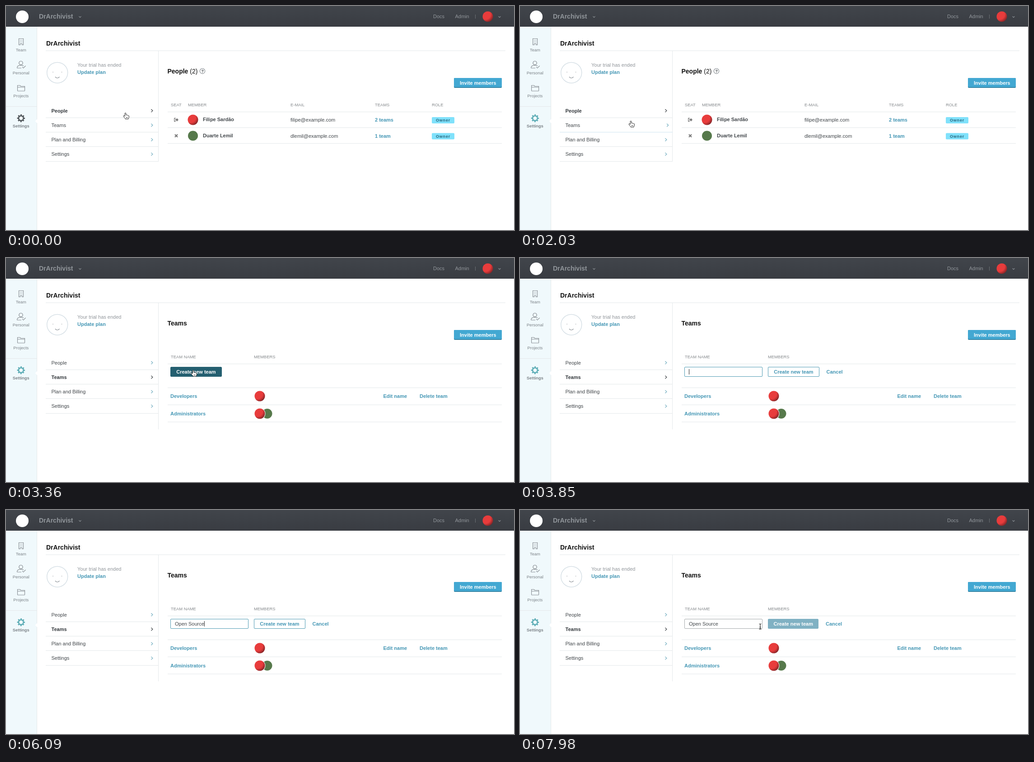
Recreate the animation shown at these times as an HTML page. Size 1125 by 498 pixels, loop 8 s.

```html
<!DOCTYPE html>
<html lang="en">
<head>
<meta charset="utf-8">
<title>Team settings</title>
<style>
html, body { margin: 0; width: 100%; height: 100%; overflow: hidden; background: #fff; }
svg { display: block; width: 100vw; height: 100vh; font: 11px "Liberation Sans", Arial, sans-serif; }
text { fill: #42474b; white-space: pre; }
.bold { font-weight: bold; }
.title { font-size: 14px; font-weight: bold; fill: #111; }
.link { font-weight: bold; fill: #4597b5; }
.head { font-size: 9.4px; fill: #85898c; }
.side { font-size: 9.4px; fill: #7c8388; text-anchor: middle; }
.nav { fill: #91969b; }
.badge { font-size: 9px; font-weight: bold; letter-spacing: .8px; fill: #28687e; }
.icon { fill: none; stroke: #8c9297; stroke-width: 1.2; }
.line { stroke: #e4e8ea; }
.chev { fill: none; stroke: #6ba9bd; stroke-width: 1.2; }
.on text { font-weight: bold; fill: #33383c; }
.on .chev { stroke: #33383c; }
.hand { fill: #fff; stroke: #222; stroke-width: 1; stroke-linejoin: round; }
</style>
</head>
<body>
<svg id="stage" viewBox="0 0 1125 498">
  <defs>
    <radialGradient id="photo" cx=".3" cy=".3" r=".85">
      <stop offset=".55" stop-color="#e83c3c"/><stop offset="1" stop-color="#6b1f22"/>
    </radialGradient>
    <linearGradient id="bar" x2="0" y2="1">
      <stop stop-color="#41454b"/><stop offset="1" stop-color="#393c42"/>
    </linearGradient>
    <circle id="red" r="11.5" fill="url(#photo)"/>
    <circle id="green" r="11" fill="#56794b"/>
  </defs>
  <g id="frame"></g>
  <g id="menu"></g>
  <g id="people"></g>
  <g id="teams">
    <g id="list"></g>
    <g id="form">
      <rect id="field" x="364.5" y="242.5" width="172" height="21" rx="1.5" fill="#fff"/>
      <text id="typed" x="374" y="257"></text>
      <path id="caret" d="M0 247v12" stroke="#222"/>
      <text id="cancel" class="link" y="257">Cancel</text>
    </g>
    <g id="create">
      <rect y="242.5" height="21" rx="1.5"/>
      <text class="bold" y="257">Create new team</text>
    </g>
  </g>
  <g id="ring" fill="none">
    <circle r="24" stroke="#fff" stroke-width="4"/><circle r="24" stroke="#1b1b1b" stroke-width="1.5"/>
  </g>
  <g id="cursor">
    <path class="hand" d="M-1.3 1Q-1.3-.4 0-.4T1.3 1V4.2Q2.9 3.6 3.6 4.8Q5 4.2 5.9 5.4Q7.7 5 7.8 6.8V9Q7.8 10.8 6.6 12.2V13.2H-.4V12.2Q-2.3 10.5-4.2 7.6Q-5 6-3.6 5.7Q-2.4 5.6-1.3 7.2ZM2 9v2.2M4.2 9v2.2" />
    <path class="hand" d="M0 0V13L3 10.2 5 14.6 7 13.7 5.1 9.5H9.2Z"/>
    <path d="M-2.5-6Q0-6 0-4.4Q0-6 2.5-6M0-4.4V4.6M-2.5 6Q0 6 0 4.6Q0 6 2.5 6M-1.5 1.5h3" fill="none" stroke="#222" stroke-width="1.2"/>
  </g>
</svg>
<script>
const LOOP = 8000, STEP = 70;
const PAGE_SWITCH = 2380, FORM_OPEN = 3500, SUBMIT = 6930;
const $ = id => document.getElementById(id);
const show = (el, visible) => el.setAttribute('visibility', visible ? 'inherit' : 'hidden');
const set = (el, attrs) => Object.entries(attrs).forEach(([k, v]) => el.setAttribute(k, v));

const text = (x, y, s, cls = '') => `<text x="${x}" y="${y}" class="${cls}">${s}</text>`;
const line = (x1, y1, x2, y2) => `<path class="line" d="M${x1} ${y1}L${x2} ${y2}"/>`;
const rect = (x, y, w, h, fill, rx = 0) =>
  `<rect x="${x}" y="${y}" width="${w}" height="${h}" fill="${fill}" rx="${rx}"/>`;
const icon = d => `<path class="icon" d="${d}"/>`;
const photo = (id, x, y) => `<use href="#${id}" x="${x}" y="${y}"/>`;

const ORG = 'DrArchivist';
$('frame').innerHTML =
  rect(0, 0, 1125, 46, 'url(#bar)') + rect(0, 46, 69, 452, '#f0f9fc') +
  '<circle cx="36" cy="24" r="14" fill="#fff"/>' +
  text(73, 27.5, ORG, 'title nav') + icon('M161.5 22.8l2.5 2.5 2.5-2.5M1090.5 22.8l2.5 2.5 2.5-2.5') +
  text(946, 27, 'Docs', 'nav') + text(994.5, 27, 'Admin', 'nav') +
  '<path d="M1039.5 19v9" stroke="#6b7075"/>' + photo('red', 1067, 23.5) +
  line(68.5, 46, 68.5, 498) + line(0, 223.5, 69, 223.5) +
  '<path d="M69.5 251L64.5 256L69.5 261Z" fill="#fff"/>' +
  icon('M28.5 72.5h10v14h-3v-3h-4v3h-3zM31 75.5h1.5M34.5 75.5h1.5M31 78h1.5M34.5 78h1.5M31 80.5h1.5M34.5 80.5h1.5') +
  icon('M33 122.5a4.2 4.2 0 1 1-.1 0zM24.5 138q0-5.5 6-6.2h5q2 .3 3.5 1.6M24.5 138h9.5M36 135.5l2.5 2.5 5-5') +
  icon('M25.5 188V176.5h5.5l1.7 2h8.8v9.5q0 1-1 1h-14q-1 0-1-1zM25.5 180.5h16') +
  text(33.3, 100.5, 'Team', 'side') + text(33.3, 151.5, 'Personal', 'side') +
  text(33.3, 202.5, 'Projects', 'side') +
  '<g id="gear" fill="none"><circle cx="33.3" cy="249.5" r="5.3" stroke-width="2.6"/>' +
  '<circle cx="33.3" cy="249.5" r="7.4" stroke-width="2.6" stroke-dasharray="2.9 2.91" stroke-dashoffset="1.45"/></g>' +
  text(33.3, 270, 'Settings', 'side bold') +
  text(89, 88, ORG, 'title') + line(88, 99.5, 1106, 99.5) +
  '<circle cx="113.7" cy="148.3" r="23" fill="none" stroke="#d0dbe2" stroke-width="1.3"/>' +
  icon('M103.2 147h1.6M122.7 147h1.6M109 157.5q4.7 5.5 9.4 0') +
  text(158, 135.3, 'Your trial has ended', 'nav') + text(158, 151, 'Update plan', 'link') +
  rect(992, 160, 106, 22, '#2b7898', 2) + rect(992, 160, 106, 20.5, '#43a8d2', 2) +
  '<text x="1005" y="174.5" class="bold" style="fill:#fff">Invite members</text>' +
  line(358, 235.5, 1098, 235.5) + '<path id="side" class="line"/>';

$('menu').innerHTML = ['People', 'Teams', 'Plan and Billing', 'Settings'].map((label, i) => {
  const y = 232.5 + i * 32.2;
  return `<g>${text(100.5, y + 4, label)}<path class="chev" d="M321.5 ${y - 3}l3.3 3.3-3.3 3.3"/>` +
    `<path class="line" d="M88 ${Math.floor(y + 16) + .5}H338"/></g>`;
}).join('');

const person = (y, id, name, mail, teams) =>
  photo(id, 414, y) + text(436, y + 3.3, name, 'bold') + text(630, y + 4, mail) +
  text(817, y + 4, teams, 'link') + rect(943, y - 6, 50, 14, '#80e1fb', 2) +
  text(952, y + 4.2, 'Owner', 'badge');
$('people').innerHTML =
  text(357.5, 149.5, 'People <tspan font-weight="normal">(2)</tspan>', 'title') +
  icon('M435 139a5.7 5.7 0 1 1-.1 0z') +
  '<text x="432.4" y="148" font-size="9" class="bold">?</text>' +
  ['SEAT', 'MEMBER', 'E-MAIL', 'TEAMS', 'ROLE']
    .map((s, i) => text([365, 403, 630, 817, 943][i], 223, s, 'head')).join('') +
  person(253, 'red', 'Filipe Sardão', 'filipe@example.com', '2 teams') +
  person(288.5, 'green', 'Duarte Lemil', 'dlemil@example.com', '1 team') +
  '<path d="M376 249.5h-3.2v7h3.2" fill="none" stroke="#777" stroke-width="1.3"/>' +
  '<path d="M375 251.5h3v-2.5l4 4-4 4v-2.5h-3z" fill="#777"/>' +
  '<path d="M374 285.5l6 6m0-6l-6 6" stroke="#777" stroke-width="2.2"/>' +
  line(358, 270.5, 1098, 270.5) + line(358, 305.5, 1098, 305.5);

$('list').innerHTML =
  text(357.5, 149.5, 'Teams', 'title') + text(365, 223, 'TEAM NAME', 'head') + text(549, 223, 'MEMBERS', 'head') +
  [288, 326, 364].map(y => line(358, y + .5, 1098, y + .5)).join('') +
  text(364, 311, 'Developers', 'link') + text(364, 349.5, 'Administrators', 'link') +
  text(835.5, 311, 'Edit name', 'link') + text(916, 311, 'Delete team', 'link') +
  photo('red', 562, 307) + photo('green', 578.5, 346) +
  '<circle cx="562" cy="346" r="12.5" fill="#fff"/>' + photo('red', 562, 346);

// Pointer tip: [time, x, y]
const path = [
  [70, 264.5, 238], [1120, 249, 252], [1260, 249, 252], [2030, 245.5, 256], [2730, 245.5, 256],
  [3220, 414.5, 250], [6090, 414.5, 250], [6650, 614, 254], [7070, 614, 254],
  [7770, 541, 256], [7840, 541, 256], [7980, 532, 259]
];
const clicks = [[2100, 2310], [3430, 3500], [6720, 6930]];
const NAME = 'Open Source';
const keys = [4060, 4270, 4410, 4620, 4760, 4970, 5110, 5250, 5390, 5530, 5740];

function pointer(t) {
  const i = path.findIndex(p => p[0] >= t);
  if (i === 0) return path[0].slice(1);
  const [t0, x0, y0] = path[i - 1], [t1, x1, y1] = path[i];
  const k = (t - t0) / (t1 - t0), e = k * k * (3 - 2 * k);
  return [x0 + (x1 - x0) * e, y0 + (y1 - y0) * e];
}

function drawMenu(page, x, y) {
  [...$('menu').children].forEach((item, i) => {
    const top = 216 + i * 32.2;
    const hover = i !== page && x > 88 && x < 338 && y > top && y < top + 32;
    item.setAttribute('class', i === page ? 'on' : '');
    item.children[1].setAttribute('transform', `translate(${hover ? 3.7 : 0})`);
    item.children[2].style.stroke = hover ? '#cfe5f0' : '';
  });
}

function drawForm(t, x, y) {
  const open = t >= FORM_OPEN, sent = t >= SUBMIT;
  const left = open ? 549 : 364, width = sent ? 112 : 114;
  const hover = x > left && x < left + width && y > 242 && y < 264;
  const [box, label] = $('create').children;
  const fill = sent ? '#80b1c3' : hover ? '#245f70' : '#fff';
  set(box, { x: left + .5, width: width - 1, fill, stroke: fill === '#fff' ? '#4f9bb3' : fill });
  label.setAttribute('x', left + (sent ? 12.5 : 13.2));
  label.style.fill = fill === '#fff' ? '#4597b5' : '#fff';

  show($('form'), open);
  set($('field'), { stroke: sent ? '#a5a9ab' : '#4f9bb3' });
  set($('cancel'), { x: sent ? 677 : 678.5 });
  const count = keys.filter(k => k <= t).length;
  $('typed').textContent = NAME.slice(0, count);
  set($('caret'), { transform: `translate(${374.5 + $('typed').getComputedTextLength()})` });
  show($('caret'), open && t >= 3640 && t < 6240);
}

function drawPointer(t, x, y) {
  const open = t >= FORM_OPEN;
  const kind = open && x > 364 && x < 537 ? 2
    : x < 338 || (x > 364 && !open) || (x > 549 && t < SUBMIT) ? 0 : 1;
  [...$('cursor').children].forEach((shape, i) => show(shape, i === kind));
  const place = { transform: `translate(${x} ${y})` };
  set($('cursor'), place);
  set($('ring'), place);
  $('cursor').style.display = t >= 3640 && t < 6160 ? 'none' : '';
  show($('ring'), clicks.some(([from, to]) => t >= from && t < to));
}

function draw(now) {
  const t = Math.floor(now % LOOP / STEP) * STEP;
  const [x, y] = pointer(t);
  const page = t < PAGE_SWITCH ? 0 : 1;
  const k = Math.min(1, t / 420), mix = (a, b) => Math.round(a + (b - a) * k);
  $('gear').setAttribute('stroke', `rgb(${mix(76, 91)},${mix(82, 172)},${mix(86, 181)})`);
  $('side').setAttribute('d', `M337.5 99.5V${page ? 381 : 346}`);
  $('people').style.display = page ? 'none' : '';
  $('teams').style.display = page ? '' : 'none';
  drawMenu(page, x, y);
  if (page) drawForm(t, x, y);
  drawPointer(t, x, y);
  requestAnimationFrame(draw);
}
requestAnimationFrame(draw);
</script>
</body>
</html>
```
